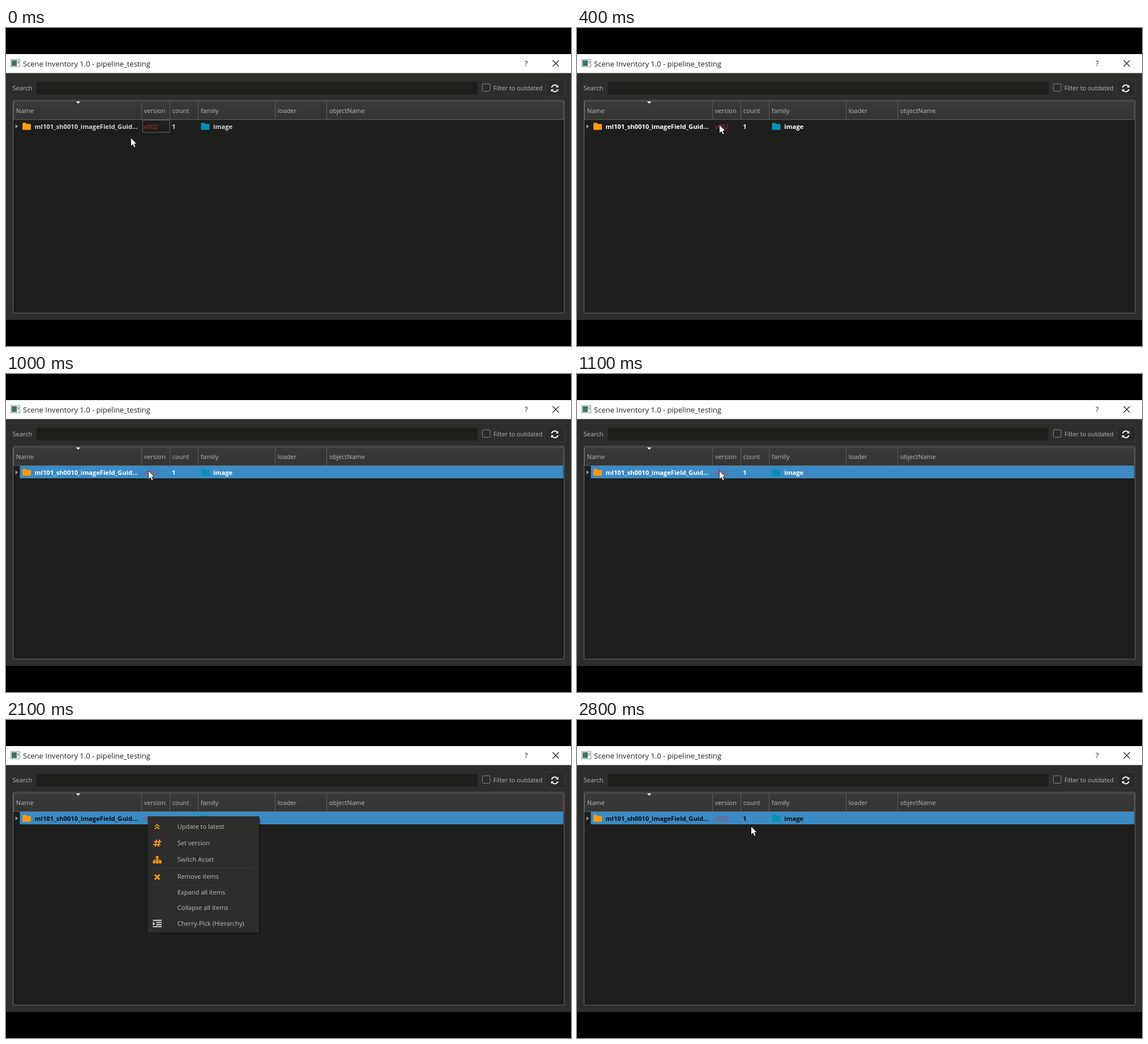
Recreate the animation shown at these times as an HTML page. Size 998 px wide and 561 px high, loop 3000 ms.

```html
<!DOCTYPE html>
<html lang="en">
<head>
<meta charset="utf-8">
<title>Scene Inventory</title>
<style>
  html, body { margin: 0; width: 100%; height: 100%; overflow: hidden; background: #000; }
  svg { display: block; width: 998px; height: 561px; font: 11.1px "Open Sans", "Noto Sans", sans-serif; fill: #b8b8b6; }
  .title { font-size: 13px; fill: #222; }
  .bold { font-size: 11.2px; font-weight: bold; }
  .line { fill: none; stroke: #5e5e5c; }
  .accent { fill: #fb9a14; }
  .stroke { fill: none; stroke: #fb9a14; }
  #menu text { fill: #bebebc; }
  #menu.over #first { fill: #eee; }
  #menu:not(.over) #glow { display: none; }
</style>
</head>
<body>
<svg viewBox="0 0 998 561">
  <defs>
    <path id="folder" d="M1.5 0H5.5L7.5 2H13.5Q15 2 15 3.5V11Q15 12.5 13.5 12.5H1.5Q0 12.5 0 11V1.5Q0 0 1.5 0Z"/>
    <linearGradient id="bar" x2="0" y2="1">
      <stop stop-color="#3a3a38"/><stop offset="1" stop-color="#343432"/>
    </linearGradient>
  </defs>

  <rect y="46" width="998" height="469" fill="#2d2d2b"/>
  <rect y="46" width="998" height="33.5" fill="#fff"/>
  <rect x="8.5" y="55.5" width="16" height="13" fill="#f2f2f2" stroke="#9a9a9a"/>
  <rect x="10" y="57" width="9" height="10" fill="#3f7468"/>
  <rect x="20" y="58" width="3" height="5" fill="#9fb4c4"/>
  <text class="title" x="30" y="68">Scene Inventory 1.0 - pipeline_testing</text>
  <text class="title" x="916" y="67">?</text>
  <path d="M965.5 57l11 11m0-11l-11 11" stroke="#222" stroke-width="1.2"/>

  <text x="11.5" y="110">Search</text>
  <rect x="54" y="95" width="779" height="22.5" rx="2" fill="#1e1f1b"/>
  <rect x="841.5" y="98.5" width="13.5" height="13" rx="2" fill="#2a2a28" stroke="#858583"/>
  <text x="861" y="109.5" font-size="10.75">Filter to outdated</text>
  <rect x="953.5" y="91.5" width="33" height="28.5" rx="2" fill="#2a2a28" stroke="#3c3c3a"/>
  <g fill="none" stroke="#f4f4f4" stroke-width="2">
    <path d="M963.8 105A5.6 5.6 0 0 1 973.6 102.6M974.8 108A5.6 5.6 0 0 1 965 110.4"/>
    <path d="M975.8 100.2V105H971ZM962.8 112.8V108H967.6Z" fill="#f4f4f4" stroke="none"/>
  </g>

  <rect x="12.5" y="127.5" width="973.5" height="375.5" rx="2" fill="#1e1f1c" stroke="#686a70"/>
  <rect x="14" y="129" width="970" height="32.5" fill="url(#bar)"/>
  <path class="line" d="M13.5 161.5V129.5H984.5V161.5Z"/>
  <path d="M123.5 129.5H131.5L127.5 133.5Z" fill="#eee"/>
  <g id="heads"></g>

  <rect id="pick" x="24.5" y="162" width="960" height="22" fill="#3b8ac4"/>
  <path d="M16.8 170L21 173.5L16.8 177Z" fill="#a2a2a0"/>
  <use href="#folder" x="29" y="167.3" class="accent"/>
  <use href="#folder" x="344.5" y="167.3" fill="#0690b6"/>
  <text id="version" x="243.5" y="177.7">v002</text>
  <g id="row" class="bold">
    <text x="50.5" y="177.7">ml101_sh0010_imageField_Guid...</text>
    <text x="293" y="177.7">1</text>
    <text x="366" y="177.7">image</text>
  </g>
  <rect id="focus" x="241.5" y="162.5" width="47.5" height="21.5" fill="none" stroke="#b0b0ae" stroke-dasharray="1 1"/>

  <g id="menu">
    <rect x="254" y="174" width="195.5" height="203" fill="#000" opacity=".35"/>
    <rect x="251" y="170.5" width="196" height="204.5" fill="#2d2d2b" stroke="#242422"/>
    <rect id="glow" x="257" y="173" width="188" height="29" fill="#3e556d"/>
    <path d="M257 261.5H440M257 290.5H440" stroke="#393937"/>
    <path class="stroke" stroke-width="1.7" d="M263 188l4-3.7 4 3.7M263 192.4l4-3.7 4 3.7"/>
    <path class="stroke" stroke-width="2" d="M261.5 214.8H274.5M260 219.8H273M266 211L263.6 223.5M271.4 211L269 223.5"/>
    <path class="stroke" stroke-width="1.4" d="M267 243V250M262 250V247H272.5V250"/>
    <path class="accent" d="M264.7 240h4.8v4.6h-4.8zM259.5 248.5h4.6v4.6h-4.6zM264.8 248.5h4.6v4.6h-4.6zM270.2 248.5h4.6v4.6h-4.6z"/>
    <path class="stroke" stroke-width="3" d="M262.8 272.8l8.6 8.6m0-8.6l-8.6 8.6"/>
    <path d="M259.5 353.5H275M265.5 357.3H275M265.5 361H275M259.5 364.5H275" stroke="#d8d8d6" stroke-width="1.9"/>
    <path d="M259.5 356L263.5 359.2L259.5 362.4Z" fill="#d8d8d6"/>
    <g id="items"></g>
  </g>

  <path id="cursor" d="M0 0V15.2L3.5 12 6 17.2 8.4 16.1 6 11H10.4Z" fill="#fff" stroke="#111" stroke-width=".8"/>
</svg>
<script>
const $ = id => document.getElementById(id);
const label = (x, y, s, id = "") => `<text x="${x}" y="${y}" id="${id}">${s}</text>`;

const columns = [[14, "Name"], [240, "version"], [290, "count"], [340, "family"], [476, "loader"], [567, "objectName"]];
$("heads").innerHTML = columns.map(([x, s], i) =>
  (i ? `<path class="line" d="M${x - .5} 129V161"/>` : "") + label(x + 3.8, 149.7, s)).join("");

const items = [[192, "Update to latest"], [221, "Set version"], [250, "Switch Asset"], [280, "Remove items"],
  [308.3, "Expand all items"], [335, "Collapse all items"], [363, "Cherry-Pick (Hierarchy)"]];
$("items").innerHTML = items.map(([y, s], i) => label(302.7, y, s, i ? "" : "first")).join("");

const show = (id, on) => $(id).style.display = on ? "" : "none";

function draw(t) {
  const step = Math.floor(t / 100);
  const selected = t >= 600, closed = t >= 2800, open = t >= 1900 && !closed;
  const k = Math.min(step / 4, 1);
  const [x, y] = closed ? [307, 187] : [220 + 31 * k, 193 - 23 * k];
  const hover = y < 185 && !open;

  show("pick", selected);
  show("focus", !selected && !hover);
  show("cursor", !open);
  show("menu", open);
  $("cursor").setAttribute("transform", `translate(${x + .5} ${y + .5})`);
  $("row").style.fill = hover ? "#fff" : selected ? "#0a0a0a" : "#d6d6d4";
  $("version").style.fill = selected ? "#c03a52" : "#c62d28";
  $("menu").style.opacity = Math.min(1, .5 + (step - 19) * .3);
  $("menu").setAttribute("class", t >= 2300 ? "over" : "");
}

let start;
function tick(now) {
  start ??= now;
  draw((now - start) % 3000);
  requestAnimationFrame(tick);
}
draw(0);
requestAnimationFrame(tick);
</script>
</body>
</html>
```
